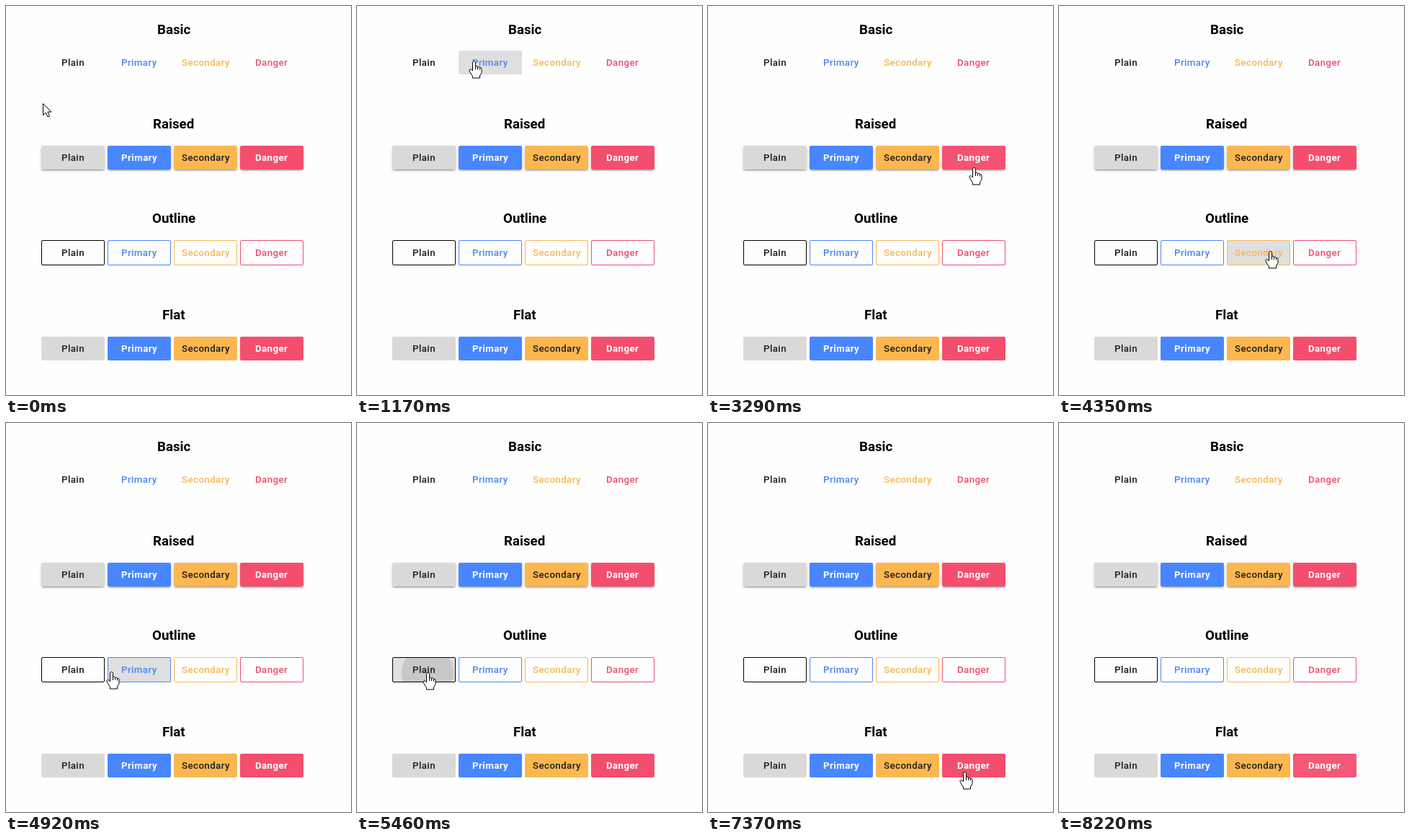
Recreate the animation shown at these times as an HTML page with a canvas. Size 479 px wide and 540 px high, loop 8.43 s.

```html
<!DOCTYPE html>
<html lang="en">
<head>
<meta charset="utf-8">
<title>Buttons</title>
<style>
html, body { margin: 0; width: 100%; height: 100%; overflow: hidden; background: #fefefe; }
canvas { display: block; width: 479px; height: 540px; }
</style>
</head>
<body>
<canvas id="stage" width="479" height="540"></canvas>
<script>
const ctx = document.getElementById('stage').getContext('2d');
const LOOP = 8430, LAST = 8220;
const W = 88, STEP = 92, LEFT = 49;
const DARK = '#1c1c1c';

const kinds = [
  { label: 'Plain', color: '#d9d9d9', ink: DARK, edge: '#000', on: DARK },
  { label: 'Primary', color: '#4886ff', ink: '#4a86f0', edge: '#4886ff', on: '#fff' },
  { label: 'Secondary', color: '#fdb750', ink: '#f9b653', edge: '#fdb750', on: DARK },
  { label: 'Danger', color: '#f44e6f', ink: '#ee4c6b', edge: '#f44e6f', on: '#fff' }
];
const rows = [
  { title: 'Basic', titleY: 39, y: 62, edge: 0 },
  { title: 'Raised', titleY: 170, y: 194, edge: 0, solid: true, raised: true },
  { title: 'Outline', titleY: 301, y: 325, edge: 1 },
  { title: 'Flat', titleY: 435, y: 459, edge: 0, solid: true }
];
rows.forEach(row => row.h = 33 + 2 * row.edge);
const grid = rows.map(row => kinds.map((kind, i) => ({ row, kind, x: LEFT + i * STEP, hovers: [] })));
const buttons = grid.flat();

// pointer stops: time, x, y
const stops = [
  [130, 51, 135], [760, 136, 80], [1170, 162, 77], [1850, 268, 82], [2310, 276, 151],
  [2740, 366, 213], [3200, 369, 214], [3700, 366, 336], [4350, 293, 341],
  [5250, 98, 347], [5650, 98, 347], [6090, 108, 486], [6540, 181, 482],
  [7700, 384, 486], [7910, 384, 486], [8200, 429, 545]
];
const presses = [
  { button: grid[1][3], t: 2700, ink: '255,255,255', alpha: 0.1 },
  { button: grid[2][0], t: 5315, ink: '0,0,0', alpha: 0.1 },
  { button: grid[3][3], t: 7910, ink: '255,255,255', alpha: 0.06 }
];

const clamp = v => Math.max(0, Math.min(1, v));

// cubic-bezier(0, 0, .2, 1)
function easeOut(p) {
  p = clamp(p);
  let lo = 0, hi = 1;
  for (let i = 0; i < 18; i++) {
    const s = (lo + hi) / 2;
    if (0.6 * s * s * (1 - s) + s * s * s < p) lo = s; else hi = s;
  }
  return 3 * lo * lo * (1 - lo) + lo * lo * lo;
}

// slope at a stop, flat where the direction turns
function tangent(i, k) {
  if (i < 1 || i > stops.length - 2) return 0;
  const slope = j => (stops[j + 1][k] - stops[j][k]) / (stops[j + 1][0] - stops[j][0]);
  const a = slope(i - 1), b = slope(i);
  return a * b > 0 ? 2 * a * b / (a + b) : 0;
}

function pointer(t) {
  let i = 0;
  while (i < stops.length - 2 && t >= stops[i + 1][0]) i++;
  const a = stops[i], b = stops[i + 1], d = b[0] - a[0], u = clamp((t - a[0]) / d), v = 1 - u;
  const at = k => a[k] * (1 + 2 * u) * v * v + tangent(i, k) * d * u * v * v
    + b[k] * u * u * (3 - 2 * u) - tangent(i + 1, k) * d * u * u * v;
  return [at(1), at(2)];
}

const inside = (b, [x, y]) => x >= b.x && x < b.x + W && y >= b.row.y && y < b.row.y + b.row.h;

// time spans during which the pointer rests on each button
for (let t = 0; t < LOOP; t += 5) {
  const p = pointer(t);
  for (const b of buttons) {
    if (!inside(b, p)) continue;
    const span = b.hovers[b.hovers.length - 1];
    if (span && t - span[1] <= 5) span[1] = t;
    else b.hovers.push([t, t]);
  }
}
for (const p of presses) [p.x, p.y] = pointer(p.t);

function box(x, y, w, h, r) {
  ctx.beginPath();
  ctx.roundRect(x, y, w, h, r);
}

function shadow(b, dy, blur, spread, alpha) {
  const away = 1000; // the casting shape stays off the stage
  ctx.save();
  ctx.shadowColor = `rgba(0,0,0,${alpha})`;
  ctx.shadowBlur = blur;
  ctx.shadowOffsetX = away;
  ctx.shadowOffsetY = dy;
  ctx.fillStyle = '#000';
  box(b.x - spread - away, b.row.y - spread, W + 2 * spread, b.row.h + 2 * spread, 2);
  ctx.fill();
  ctx.restore();
}

function elevation(b, t) {
  const press = presses.find(p => p.button === b);
  const lift = press ? easeOut((t - press.t) / 280) * (1 - easeOut((t - press.t - 300) / 280)) : 0;
  const mix = (a, c) => a + (c - a) * lift;
  shadow(b, mix(3, 5), mix(1, 5), mix(-2, -3), 0.2);
  shadow(b, mix(2, 8), mix(2, 10), mix(0, 1), 0.14);
  shadow(b, mix(1, 3), mix(5, 14), mix(0, 2), 0.12);
}

function text(str, center, y, font, color, spacing) {
  ctx.font = font + ' Roboto, sans-serif';
  ctx.letterSpacing = spacing;
  ctx.fillStyle = color;
  ctx.fillText(str, Math.round(center - ctx.measureText(str).width / 2), y);
}

function ripple(p, t) {
  const age = t - p.t;
  if (age < 0 || age > 850) return;
  const { x, row } = p.button;
  const far = Math.hypot(Math.max(p.x - x, x + W - p.x), Math.max(p.y - row.y, row.y + row.h - p.y));
  ctx.fillStyle = `rgba(${p.ink},${p.alpha * (1 - easeOut((age - 450) / 400))})`;
  ctx.beginPath();
  ctx.arc(p.x, p.y, far * easeOut(age / 450), 0, Math.PI * 2);
  ctx.fill();
}

function drawButton(b, t) {
  const { row, kind, x } = b, { y, h, edge, solid } = row;
  if (row.raised) elevation(b, t);

  ctx.save();
  box(x, y, W, h, 2);
  ctx.clip();
  if (solid) {
    ctx.fillStyle = kind.color;
    ctx.fillRect(x, y, W, h);
  } else {
    for (const [from, to] of b.hovers) {
      const amount = easeOut((t - from) / 200) * (1 - easeOut((t - to) / 200));
      ctx.fillStyle = `rgba(0,0,0,${0.12 * amount})`;
      ctx.fillRect(x, y, W, h);
    }
  }
  presses.filter(p => p.button === b).forEach(p => ripple(p, t));
  ctx.restore();

  if (edge) {
    ctx.strokeStyle = kind.edge;
    ctx.lineWidth = edge;
    box(x + 0.5, y + 0.5, W - 1, h - 1, 1.5);
    ctx.stroke();
  }
  const ink = solid ? kind.on : kind.ink;
  const weight = ink === '#fff' ? 700 : 500;
  text(kind.label, x + W / 2, y + 21 + edge, weight + ' 13.333px', ink, '0.4px');
}

const arrow = new Path2D('M0 0V16L4 12.5L6.5 18.5L9 17.5L6.5 11.5H11.5Z');
const hand = new Path2D('M-2 12V1Q-2-1 0-1T2 1V6Q4.500 5 5 7Q7.500 6 8 8Q10.500 7.500 10.500 10V15L8 19.500V22.500H-2V20L-6 13.500Q-7.500 10.500-5.500 10Q-4 9.800-2 12.500Z');
const knuckles = new Path2D('M2 6V10.500M5 7V10.500M8 8V11');

function drawPointer(p) {
  const over = buttons.some(b => inside(b, p));
  const shape = over ? hand : arrow;
  ctx.save();
  ctx.translate(Math.round(p[0]) + 0.5, Math.round(p[1]) + 0.5);
  ctx.fillStyle = '#fff';
  ctx.strokeStyle = '#000';
  ctx.lineWidth = 1;
  ctx.lineJoin = 'round';
  ctx.fill(shape);
  ctx.stroke(shape);
  if (over) ctx.stroke(knuckles);
  ctx.restore();
}

function draw(t) {
  ctx.fillStyle = '#fefefe';
  ctx.fillRect(0, 0, 479, 540);
  for (const row of rows) text(row.title, 233, row.titleY, 'bold 18.72px', '#000', '0px');
  for (const b of buttons) drawButton(b, t);
  drawPointer(pointer(t));
}

const start = performance.now();
function tick() {
  draw(Math.min((performance.now() - start) % LOOP, LAST));
  requestAnimationFrame(tick);
}
tick();
</script>
</body>
</html>
```
